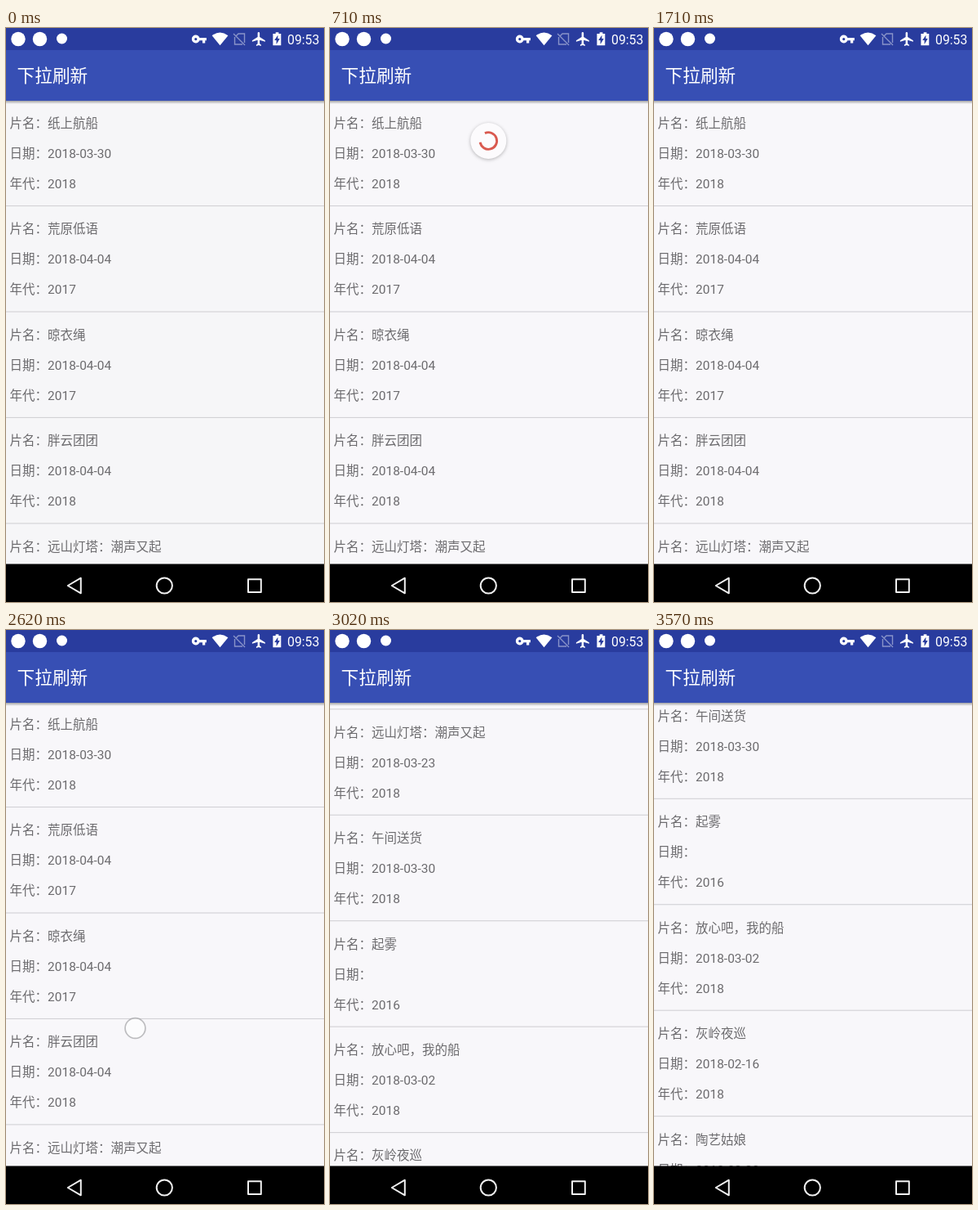
An HTML page for the animation above (3.72 s loop, 390 by 702 pixels).

```html
<!DOCTYPE html>
<html lang="zh-CN">
<head>
<meta charset="utf-8">
<title>下拉刷新</title>
<style>
  html, body { margin: 0; width: 100%; height: 100%; overflow: hidden; background: #000; }
  svg { display: block; width: 390px; height: 702px; }
  text { font: 15.5px Roboto, "Noto Sans CJK SC", "Noto Sans CJK", sans-serif; white-space: pre; }
  #list text { fill: #6c6b6e; }
  #list rect { fill: #d2d1d5; }
  #title { font-size: 21.7px; fill: #fff; }
  #clock { font-size: 15.8px; fill: #fff; }
  #spinner circle { fill: #fcfbfd; filter: drop-shadow(0 1px 2px rgba(0, 0, 0, .28)); }
</style>
</head>
<body>
<svg viewBox="0 0 390 702">
  <defs>
    <linearGradient id="shade" x2="0" y2="1">
      <stop offset="0" stop-color="#000" stop-opacity=".34"/>
      <stop offset="1" stop-color="#000" stop-opacity="0"/>
    </linearGradient>
  </defs>
  <rect id="page" width="390" height="702" fill="#f8f7fa"/>
  <g id="list"></g>
  <g id="spinner">
    <circle r="22"/>
    <path id="arc" fill="none" stroke="#d9594f" stroke-width="2.9"/>
    <path id="arrow" d="M-5.2 0H5.2L0 5.4z" fill="#d9594f"/>
  </g>

  <rect y="89" width="390" height="4" fill="url(#shade)"/>
  <rect y="26" width="390" height="63" fill="#374fb4"/>
  <rect width="390" height="27" fill="#293c9e"/>
  <text id="title" x="13.5" y="66">下拉刷新</text>

  <g fill="#fff">
    <circle cx="15" cy="13.5" r="8.7"/>
    <circle cx="41.5" cy="13.5" r="8.7"/>
    <circle cx="68.5" cy="13" r="6.5"/>
    <path transform="translate(227 3.7) scale(.82)" fill-rule="evenodd" d="M12.65 10C11.83 7.67 9.61 6 7 6a6 6 0 0 0 0 12c2.61 0 4.83-1.67 5.65-4H17v4h4v-4h2v-4zM7 14a2 2 0 1 1 0-4 2 2 0 0 1 0 4z"/>
    <path d="M262.5 21.3 252.6 9.2Q262.5 1.8 272.4 9.2z"/>
    <path transform="translate(300.2 3.4) scale(.84)" d="M21 16v-2l-8-5V3.5a1.5 1.5 0 0 0-3 0V9l-8 5v2l8-2.5V19l-2 1.5V22l3.5-1 3.5 1v-1.5L13 19v-5.5z"/>
    <path d="M330.7 5.2h3.7v1.9h2.9v14.2h-9.9V7.1h3.3z"/>
    <path d="M333.4 8.8v4.1h2.4l-4.2 7v-5h-2.4z" fill="#293c9e"/>
  </g>
  <path d="M281.5 10.5 285 7H292.5V18M280.5 11V20H290M279 7 293 21" fill="none" stroke="#fff" stroke-opacity=".45" stroke-width="1.4"/>
  <text id="clock" x="345" y="19.6">09:53</text>

  <rect y="655.5" width="390" height="46.5" fill="#000"/>
  <g fill="none" stroke="#f0f0f0" stroke-width="2" stroke-linejoin="round">
    <path d="M75.8 682 91.8 672.7V691.3z"/>
    <circle cx="194.3" cy="682" r="9.6"/>
    <rect x="297" y="674.2" width="15.8" height="15.8"/>
  </g>
  <circle id="touch" r="12.4" fill="#fff" fill-opacity=".62" stroke="#807f83" stroke-opacity=".5" stroke-width="1.7"/>
</svg>
<script>
const LOOP = 3720, PITCH = 129.45;
const TICKS = [0, 170, 250, 320, 400, 480, 550, 630, 710, 790, 870, 940, 1020, 1100, 1170, 1250,
  1330, 1400, 1480, 1560, 1630, 1710, 2620, 2720, 2800, 2870, 2950, 3020, 3100, 3180, 3250, 3320,
  3400, 3480, 3570];
const FILMS = [
  ['纸上航船', '2018-03-30', 2018],
  ['荒原低语', '2018-04-04', 2017],
  ['晾衣绳', '2018-04-04', 2017],
  ['胖云团团', '2018-04-04', 2018],
  ['远山灯塔：潮声又起', '2018-03-23', 2018],
  ['午间送货', '2018-03-30', 2018],
  ['起雾', '', 2016],
  ['放心吧，我的船', '2018-03-02', 2018],
  ['灰岭夜巡', '2018-02-16', 2018],
  ['陶艺姑娘', '2018-03-30', 2018]
];

const $ = id => document.getElementById(id);
const list = $('list'), spinner = $('spinner'), arc = $('arc'), arrow = $('arrow'), touch = $('touch');

list.innerHTML = FILMS.map(([name, date, year], i) => {
  const lines = ['片名：' + name, '日期：' + date, '年代：' + year];
  return `<g transform="translate(0 ${i * PITCH})">` +
    lines.map((s, k) => `<text x="4.5" y="${122 + k * 37}">${s}</text>`).join('') +
    '<rect y="217" width="390" height="1.1"/></g>';
}).join('');

const span = (t, a, b) => Math.min(1, Math.max(0, (t - a) / (b - a)));
const mix = (a, b, p) => a + (b - a) * p;
const smooth = p => p * p * (3 - 2 * p);
const easeOut = p => 1 - (1 - p) ** 3;
const show = (el, on) => el.setAttribute('visibility', on ? 'visible' : 'hidden');
const place = (el, x, y, more = '') => el.setAttribute('transform', `translate(${x} ${y}) ${more}`);

function scrollAt(t) {
  if (t < 2620) return 0;
  return t < 2870 ? mix(1, 350.5, span(t, 2620, 2870)) : mix(350.5, 658.5, easeOut(span(t, 2870, 3570)));
}

function drawArc(start, end) {
  const r = 10.3, point = a => {
    const rad = a * Math.PI / 180;
    return `${r * Math.cos(rad)} ${r * Math.sin(rad)}`;
  };
  arc.setAttribute('d', `M${point(start)}A${r} ${r} 0 ${end - start > 180 ? 1 : 0} 1 ${point(end)}`);
  arrow.setAttribute('transform', `rotate(${end}) translate(${r} 0)`);
}

function drawSpinner(t) {
  const on = t >= 170 && t < 1710;
  show(spinner, on);
  show(arrow, on && t < 630);
  if (!on) return;
  const pull = span(t, 170, 550);
  const y = t < 550 ? mix(67, 186, pull) : mix(186, 138, easeOut(span(t, 550, 710)));
  place(spinner, 194.3, y, `scale(${1 - span(t, 1560, 1710)})`);
  arc.setAttribute('opacity', pull < .7 ? .35 : 1);
  arrow.setAttribute('opacity', pull < .7 ? .35 : 1);
  if (t < 710) {
    const start = mix(-205, -115, pull);
    drawArc(start, start + 285 * Math.min(1, .05 + pull * 1.2));
  } else {
    // The tail catches the head, then the head runs ahead again.
    const u = (t - 710) / 666, turn = 108 * u;
    drawArc(-115 + 271 * smooth(Math.min(1, u)) + turn, 170 + 271 * smooth(Math.max(0, u - 1)) + turn);
  }
}

function drawTouch(t) {
  const down = t >= 170 && t < 630, up = t >= 2620 && t < 2950;
  show(touch, down || up);
  if (down) {
    const p = span(t, 170, 550);
    place(touch, mix(190, 199, p), mix(190, 447, p));
  } else if (up) {
    const p = span(t, 2620, 2870);
    place(touch, mix(158.5, 63.3, p), mix(487, 140, p));
  }
}

function draw(t) {
  $('page').setAttribute('fill', t < 170 ? '#f6f6f8' : '#f8f7fa');
  place(list, 0, -scrollAt(t));
  drawSpinner(t);
  drawTouch(t);
}

const origin = performance.now();
function loop(now) {
  const t = Math.max(0, now - origin) % LOOP;
  draw(TICKS.findLast(k => k <= t));
  requestAnimationFrame(loop);
}
draw(0);
requestAnimationFrame(loop);
</script>
</body>
</html>
```
